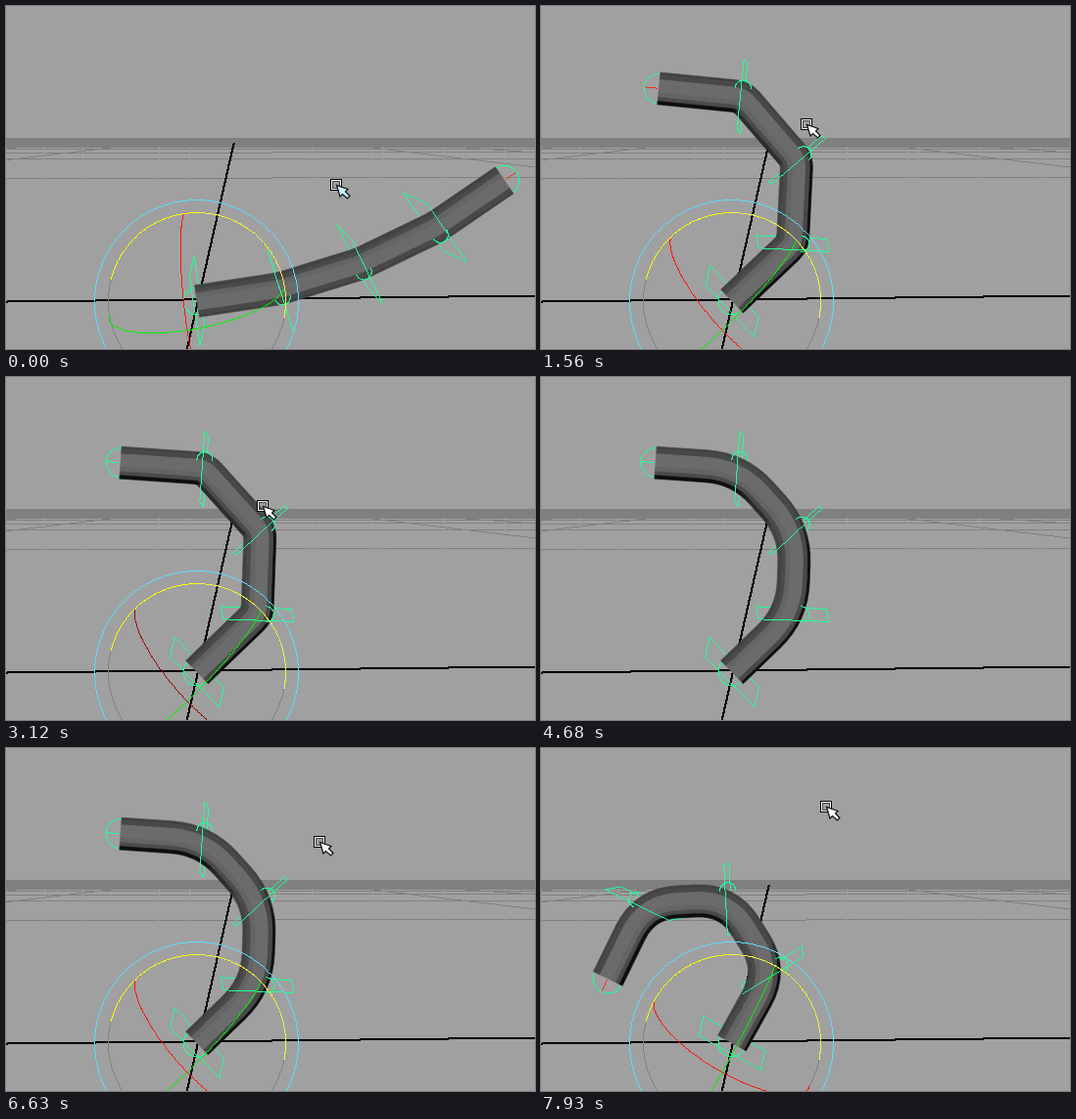
These frames come from a looping animation (540 by 351 pixels, 8000 ms). An HTML page with a canvas:

```html
<!DOCTYPE html>
<html>
<head>
<meta charset="utf-8">
<style>
html, body { margin: 0; width: 100%; height: 100%; overflow: hidden; background: #a0a0a0; }
canvas { display: block; }
</style>
</head>
<body>
<canvas id="stage" width="540" height="351"></canvas>
<script>
const ctx = document.getElementById('stage').getContext('2d');
const LOOP = 8000, STEP = 130;
const GREEN = '#22ff98', GREY = '#808080', YELLOW = '#ffff00';
const ROOT = [195, 302], BONE = 85.5, RING = 90.5;

// time, bend per joint in degrees, pointer x and y
const keys = [
  [130, 8.6, 337, 183], [260, 8.6, 352, 177], [390, 8.6, 352, 177],
  [1040, 56, 252, 88], [1300, 56, 252, 88], [2210, -10, 351, 264],
  [3120, 44, 262, 132], [3250, 44, 262, 132], [3380, 44, 298, 246],
  [6370, 44, 320, 96], [6630, 44, 320, 96], [7020, 2, 362, 205], [7930, 61, 291, 60]
];

const clamp = (v, lo = 0, hi = 1) => Math.min(hi, Math.max(lo, v));
const mix = (a, b, k) => a + (b - a) * k;
const ramp = (t, a, b) => clamp((t - a) / (b - a));
const ease = k => (1 - Math.cos(Math.PI * k)) / 2;
const add = (p, v, k = 1) => [p[0] + v[0] * k, p[1] + v[1] * k];
const lerp = (p, q, k) => p.map((v, i) => mix(v, q[i], k));

function stateAt(t) {
  const i = clamp(keys.findIndex(k => k[0] >= t), 1, keys.length - 1);
  const a = keys[i - 1], b = keys[i];
  return lerp(a, b, ease(ramp(t, a[0], b[0]))).slice(1);
}

// hard-edged line, pixel by pixel; gap 2 makes it dotted
function plot(points, color, size = 1, gap = 1) {
  ctx.fillStyle = color;
  for (let i = 1; i < points.length; i++) {
    const a = points[i - 1], b = points[i];
    const n = Math.ceil(Math.max(Math.abs(b[0] - a[0]), Math.abs(b[1] - a[1]))) || 1;
    for (let k = 0; k <= n; k += gap) {
      const p = lerp(a, b, k / n);
      ctx.fillRect(Math.floor(p[0]), Math.floor(p[1]), size, size);
    }
  }
}

// arc spanned by two axes; angles in units of pi
function arc(c, u, v, from, to, color, gap) {
  const n = 60;
  const points = Array.from({ length: n + 1 }, (_, i) => {
    const a = mix(from, to, i / n) * Math.PI;
    return add(add(c, u, Math.cos(a)), v, Math.sin(a));
  });
  plot(points, color, 1, gap);
}
const circle = (c, r, from, to, color, gap) => arc(c, [r, 0], [0, r], from, to, color, gap);

function polygon(points, fill, line, width) {
  ctx.beginPath();
  points.forEach(p => ctx.lineTo(...p));
  ctx.closePath();
  ctx.fillStyle = fill;
  ctx.strokeStyle = line;
  ctx.lineWidth = width;
  ctx.fill();
  ctx.stroke();
}

function drawGround() {
  ctx.fillStyle = '#a0a0a0';
  ctx.fillRect(0, 0, 540, 351);
  ctx.fillStyle = GREY;
  ctx.fillRect(0, 135, 540, 9);
  for (let n = 1; n < 6; n++) {
    const y = 137 + 39 / n;
    plot([[0, y + 1 / n], [540, y - 1 / n]], GREY);
  }
  for (const slope of [.12, .07]) {
    for (const x of [0, 540]) plot([[240 + Math.sign(x - 240) * 14 / slope, 143], [x, 129 + Math.abs(x - 240) * slope]], GREY);
  }
  plot([[0, 302], [540, 296]], '#000', 2);
  plot([[232, 140], [184, 351]], '#000', 2);
}

function skeleton(bend) {
  const joints = [ROOT], ups = [];
  for (let i = 0; i < 4; i++) {
    const a = bend * (i + 1) * Math.PI / 180;
    joints.push(add(joints[i], [Math.cos(a), -Math.sin(a)], BONE));
    ups.push([-Math.sin(a), -Math.cos(a)]);
  }
  return { joints, ups };
}

function centerLine(joints, round) {
  const line = [joints[0]];
  for (let i = 1; i < 4; i++) {
    const p = joints[i];
    const a = lerp(p, joints[i - 1], round / 2), b = lerp(p, joints[i + 1], round / 2);
    for (let k = 0; k <= 8; k++) line.push(lerp(lerp(a, p, k / 8), lerp(p, b, k / 8), k / 8));
  }
  line.push(joints[4]);
  return line;
}

function drawTube(line, bend) {
  const normals = line.map((p, i) => {
    const a = line[Math.max(0, i - 1)], b = line[Math.min(line.length - 1, i + 1)];
    const dx = b[0] - a[0], dy = b[1] - a[1], d = Math.hypot(dx, dy);
    return [dy / d, -dx / d];
  });
  const edges = [-16.5, -13.5, -9, 4, 9, 13, 16.5], tones = [66, 72, 107, 100, 74, 66];
  const curl = ramp(bend, 12, 37);
  for (let i = 0; i < line.length - 1; i++) {
    const [nx, ny] = lerp(normals[i], normals[i + 1], .5);
    const edge = (base, offset, j) => add(line[j], normals[j], offset);
    tones.forEach((tone, j) => {
      const shade = (nx * .6 + ny) * Math.sign(edges[j]);
      if (j % 5 === 0) tone = mix(tone, 14, curl * clamp(shade * 2));
      const color = `rgb(${tone},${tone},${tone})`;
      polygon([
        edge(0, edges[j], i), edge(0, edges[j], i + 1),
        edge(0, edges[j + 1], i + 1), edge(0, edges[j + 1], i)
      ], color, color, .6);
    });
  }
}

// step towards the viewer, away from the vanishing point
const depth = p => [(p[0] - 235) * .06, (p[1] - 135) * .06];

function drawControls({ joints, ups }, front) {
  ups.forEach((up, i) => {
    const p = joints[i], z = depth(p);
    const a = add(p, up, 36), b = add(p, up, -36);
    if (!front) return plot([add(a, z), add(a, z, -1), add(b, z, -1), add(b, z)], GREEN);
    plot([add(a, z), add(b, z)], GREEN);
    if (i) arc(add(p, up, -9), [up[0] * 8, up[1] * 8], [up[1] * 8, -up[0] * 8], .5, 1.5, GREEN);
  });
}

function drawEnds({ joints, ups }, color) {
  const cap = (p, up, r) => {
    const along = [-up[1], up[0]];
    arc(p, [up[0] * r, up[1] * r], [along[0] * Math.abs(r), along[1] * Math.abs(r)].map(v => v * Math.sign(r)), 0, 1, GREEN);
    return along;
  };
  const along = cap(joints[4], ups[3], 15);
  plot([add(joints[4], along, 2), add(joints[4], along, 14)], color);
  cap(ROOT, ups[0], -14);
}

function drawManipulator(bend, dim) {
  const a = bend * Math.PI / 180, x = Math.cos(a) * RING, y = Math.sin(a) * RING;
  const z = [-.11 * RING, .33 * RING];
  circle([194.5, 302.5], 104, 0, 2, '#5cdcff');
  circle(ROOT, RING, 0, 2, GREY);
  arc(ROOT, [-y, -x], z, 0, 1, dim ? '#960808' : '#ff1408');
  arc(ROOT, [x, -y], z, 0, 1, '#00f000');
  circle(ROOT, RING, 1.08, 1.5, YELLOW);
  circle(ROOT, RING, 1.5, 2.06, '#d8d8c0');
  circle(ROOT, RING, 1.5, 2.06, YELLOW, 2);
}

function drawPointer(x, y, tint) {
  ctx.save();
  ctx.translate(Math.round(x), Math.round(y));
  ctx.lineWidth = 1;
  ['#000', '#fff', '#444'].forEach((color, i) => {
    ctx.strokeStyle = color;
    ctx.strokeRect(i - 5.5, i - 5.5, 11 - 2 * i, 11 - 2 * i);
  });
  polygon([[.5, .5], [4, 12], [6.5, 9.5], [11.5, 14], [14, 11.5], [9.5, 7], [12, 4.5]], tint, '#111', 1.2);
  ctx.restore();
}

function draw(now) {
  const t = Math.floor(now % LOOP / STEP) * STEP;
  const [bend, x, y] = stateAt(t);
  const smooth = ramp(t, 4030, 4680) - ramp(t, 4810, 5720) + ramp(t, 5720, 6370);
  const rig = skeleton(bend);
  const idle = t >= 3120 && t <= 6630;
  drawGround();
  drawControls(rig, false);
  drawEnds(rig, idle ? GREEN : '#ff2a1a');
  drawTube(centerLine(rig.joints, mix(.2, .78, smooth)), bend);
  drawControls(rig, true);
  if (t < 4030 || t >= 6240) drawManipulator(bend, idle && t < 4030);
  if (t < 3510 || t >= 6240) drawPointer(x, y, t < 520 ? '#c8f0ff' : '#fff');
}

const start = performance.now();
function tick() {
  draw(performance.now() - start);
  requestAnimationFrame(tick);
}
tick();
</script>
</body>
</html>
```
